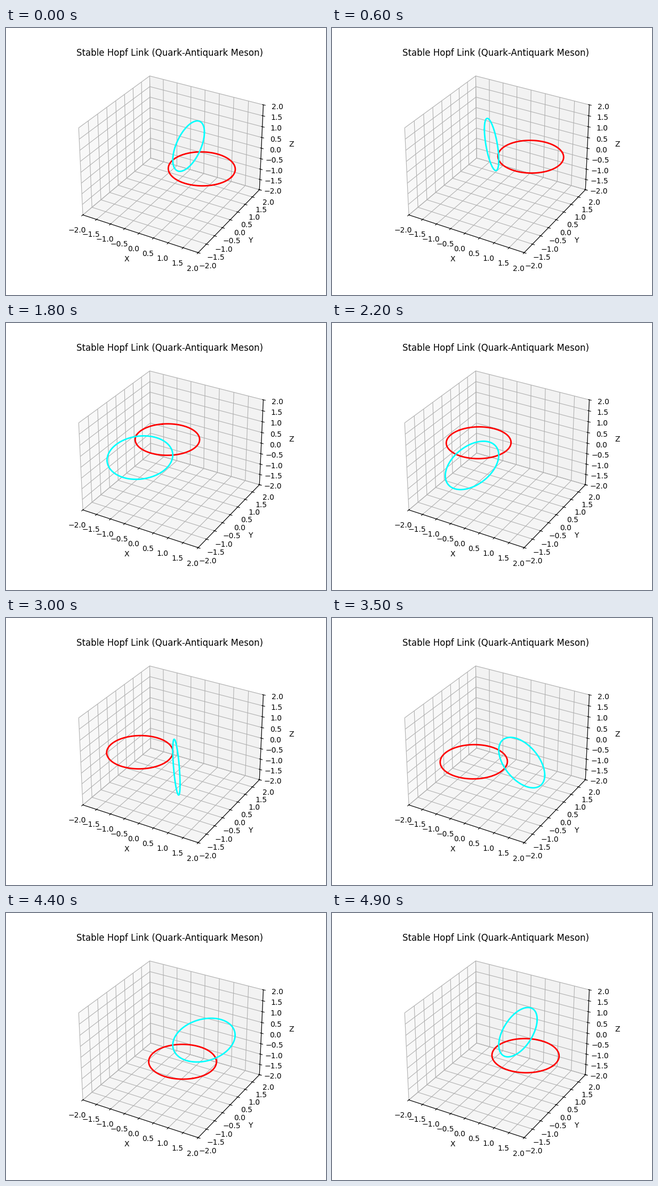
A matplotlib script for the animation above (5 s loop, 600 by 500 pixels).

```python
import numpy as np
import matplotlib.pyplot as plt
from matplotlib.animation import FuncAnimation

FRAMES = 50
INTERVAL = 100  # ms

fig = plt.figure(figsize=(6, 5), dpi=100)
ax = fig.add_subplot(111, projection="3d")
ax.set(xlim=(-2, 2), ylim=(-2, 2), zlim=(-2, 2),
       xlabel="X", ylabel="Y", zlabel="Z",
       title="Stable Hopf Link (Quark-Antiquark Meson)")

# Two unit circles through the origin: one horizontal, one vertical.
t = np.linspace(0, 2 * np.pi, 100)
flat_ring = np.array([1 + np.cos(t), np.sin(t), 0 * t])
upright_ring = np.array([0 * t, 1 + np.cos(t), np.sin(t)])

flat_line, = ax.plot(*flat_ring, color="red", lw=2)
upright_line, = ax.plot(*upright_ring, color="cyan", lw=2)


def spin(points, angle):
    """Rotate points about the z axis."""
    c, s = np.cos(angle), np.sin(angle)
    return np.array([[c, -s, 0], [s, c, 0], [0, 0, 1]]) @ points


def update(frame):
    angle = 2 * np.pi * frame / FRAMES
    flat_line.set_data_3d(*spin(flat_ring, angle))
    upright_line.set_data_3d(*spin(upright_ring, angle))
    return flat_line, upright_line


anim = FuncAnimation(fig, update, frames=FRAMES, interval=INTERVAL,
                     repeat=True, blit=False)
plt.show()
```
